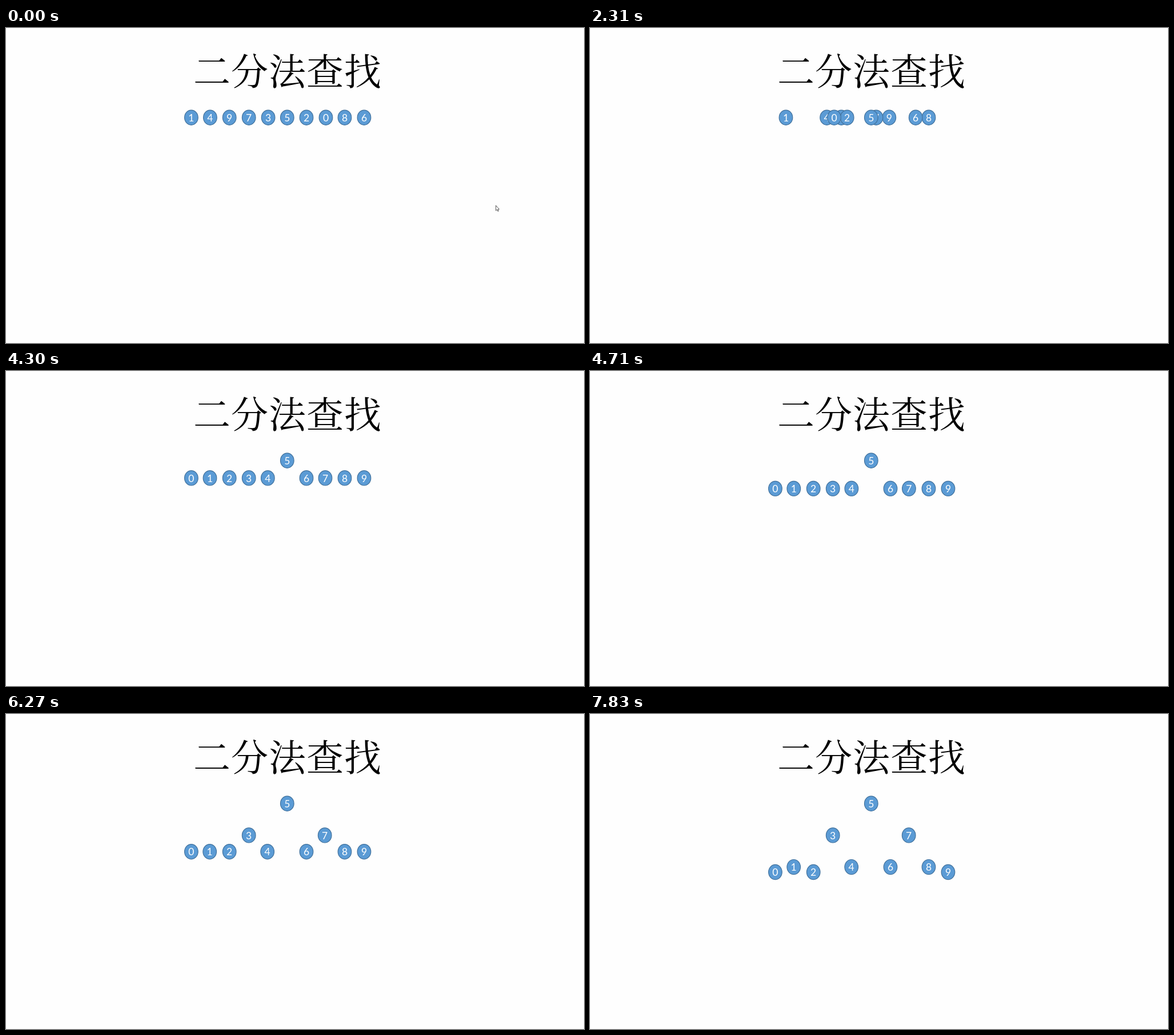
These frames come from a looping animation (1012 by 553 pixels, 7.99 s). An HTML page:

```html
<!DOCTYPE html>
<html lang="zh">
<head>
<meta charset="utf-8">
<title>二分法查找</title>
<style>
html, body { margin: 0; width: 100%; height: 100%; overflow: hidden; background: #fefefe; }
svg { display: block; width: 1012px; height: 553px; }
.title { font: 400 65px "Noto Serif CJK SC", "Noto Sans CJK SC", serif; letter-spacing: 1px; }
.ball ellipse { fill: #5b9bd5; stroke: #41719c; stroke-width: 1.2; }
.ball text { font: 400 17.5px Lato, sans-serif; fill: #fff; text-anchor: middle; }
</style>
</head>
<body>
<svg viewBox="0 0 1012 553">
  <rect width="1012" height="553" fill="#fefefe"/>
  <text class="title" x="328" y="99.8">二分法查找</text>
  <g id="balls"></g>
  <path id="pointer" d="M857.7 311.6V320.6L859.7 318.8L861.2 321.9L862.5 321.3L861.1 318.2H863.6Z"
    fill="#fff" stroke="#444" stroke-width="0.9"/>
</svg>
<script>
const LOOP = 7990, MOVE = 2000, FIRST = 1256, STEP = 142;
const TOP = 157.2, drops = [55.7, 55.7, 68];
const order = "1497352086";
const slots = [324.4, 357.4, 391.2, 425.2, 459.1, 492.3, 526, 560, 593, 627];
const level = [3, 2, 3, 1, 2, 0, 2, 1, 2, 3];
const nudge = { 1: -0.7, 4: -1.4, 7: -1.8 };
// Screen refresh times; gaps between them split into even steps
const ticks = [0, 1440, 2310, 2460, 2590, 3460, 3590, 3740, 4300, 4430, 4710, 4870,
  5430, 5580, 5860, 5990, 6270, 6430, 6990, 7140, 7830, LOOP];

const pointer = document.getElementById("pointer");
const layer = document.getElementById("balls");

function add(parent, tag, attrs) {
  const el = document.createElementNS("http://www.w3.org/2000/svg", tag);
  for (const key in attrs) el.setAttribute(key, attrs[key]);
  return parent.appendChild(el);
}

const balls = [...order].map((digit, i) => {
  const g = add(layer, "g", { class: "ball" });
  add(g, "ellipse", { rx: 11.8, ry: 13.1 });
  add(g, "text", { y: 6.6 }).textContent = digit;
  return { g, from: slots[i], to: slots[digit], level: level[digit], nudge: nudge[digit] || 0 };
});

function snap(t) {
  let i = 0;
  while (i < ticks.length - 2 && t >= ticks[i + 1]) i++;
  if (i === 0) return 0;
  const span = ticks[i + 1] - ticks[i];
  const step = span / Math.round(span / STEP);
  return ticks[i] + Math.floor((t - ticks[i]) / step) * step;
}

// Symmetric speed-up and slow-down
function ease(u) {
  u = Math.min(1, Math.max(0, u));
  return u < 0.5 ? (2 * u) ** 2.4 / 2 : 1 - (2 - 2 * u) ** 2.4 / 2;
}

function draw(time) {
  const t = snap(time);
  const phase = k => ease((t - FIRST - k * MOVE) / MOVE);
  const sorted = phase(0);
  for (const b of balls) {
    const x = b.from + (b.to - b.from) * sorted + b.nudge * phase(1);
    let y = TOP;
    for (let k = 1; k <= b.level; k++) y += drops[k - 1] * phase(k);
    b.g.setAttribute("transform", `translate(${x.toFixed(2)} ${y.toFixed(2)})`);
  }
  pointer.setAttribute("visibility", t < 1440 ? "visible" : "hidden");
}

const start = performance.now();
function frame() {
  draw((performance.now() - start) % LOOP);
  requestAnimationFrame(frame);
}
frame();
</script>
</body>
</html>
```
